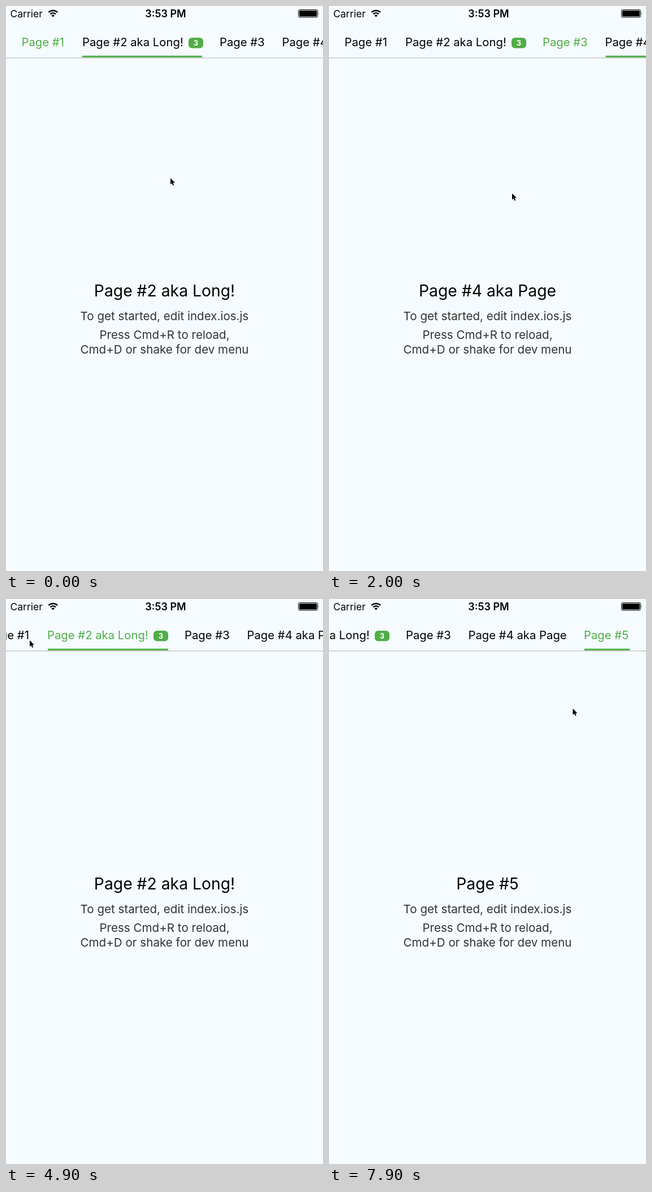
Write an HTML page that moves like this. It is 561 px wide and 998 px high and loops after 8000 ms.

```html
<!DOCTYPE html>
<html lang="en">
<head>
<meta charset="utf-8">
<title>Scrollable tabs</title>
<style>
  html, body { margin: 0; width: 100%; height: 100%; overflow: hidden; background: #f5fbff; }
  svg { display: block; font-family: Inter, Roboto, sans-serif; }
  .status { font-size: 17.5px; }
  .clock { font-size: 18px; font-weight: 600; }
  .tab { font-size: 20.3px; }
  .on { fill: #50ad47; }
  .badge { font-size: 13px; font-weight: 700; fill: #fff; }
  .title { font-size: 28.3px; }
  .note { font-size: 20.6px; fill: #333; }
  .mid { text-anchor: middle; }
</style>
</head>
<body>
<svg width="561" height="998" viewBox="0 0 561 998">
  <g class="status">
    <text x="7.5" y="19.5">Carrier</text>
    <text class="clock mid" x="282.5" y="19.5">3:53 PM</text>
  </g>
  <g fill="none" stroke="#000" stroke-width="2.4">
    <path d="M75.3 11.2a11.2 11.2 0 0 1 15.8 0M78.4 14.4a6.8 6.8 0 0 1 9.6 0"/>
    <path d="M83.2 19.6l-2.8-2.8a4 4 0 0 1 5.6 0z" fill="#000" stroke="none"/>
    <rect x="517.5" y="6.5" width="34" height="13.5" rx="2.5" stroke-width="1"/>
    <rect x="519" y="8" width="31" height="10.5" rx="1.2" fill="#000" stroke="none"/>
    <path d="M552.6 11q1.6 2.2 0 4.4z" fill="#000" stroke="none"/>
  </g>
  <path d="M0 91.7H561" stroke="#c6c9cb" stroke-width="1.5"/>
  <g id="bar">
    <rect id="line" class="on" y="87.7" height="3.1"/>
    <rect class="on" x="323" y="56" width="26" height="18.5" rx="6"/>
    <text class="badge mid" x="336" y="70">3</text>
  </g>
  <g id="pages"></g>
  <path id="cursor" d="M0 0V11.3L2.6 8.9 4.4 13 6.2 12.2 4.5 8.2H8Z" stroke="#fff" stroke-width="1" paint-order="stroke"/>
</svg>
<script>
const LOOP = 8000, STEP = 100, WIDTH = 561, PAGE = 564.5;
const SLIDE = 600, SCROLL = 300, SETTLE = 700, LAG = 33;
const MARGIN = 74, MAX_SCROLL = 242;

const tabs = [
  { name: 'Page #1', left: 28.5, right: 106 },
  { name: 'Page #2 aka Long!', left: 136, right: 349 },
  { name: 'Page #3', left: 379, right: 459 },
  { name: 'Page #4 aka Page', left: 489.5, right: 663 },
  { name: 'Page #5', left: 694, right: 774.5 }
];

// A tap selects its tab at once; a swipe selects it after the page settles.
const moves = [
  { start: -600, page: 1 },
  { start: 560, page: 2 },
  { start: 1360, page: 3 },
  { start: 2400, page: 4 },
  { start: 3900, page: 1, tap: true },
  { start: 4920, page: 0, tap: true },
  { start: 6500, page: 3, tap: true },
  { start: 7120, page: 4, tap: true }
];

// Cursor stops: time, x, y.
const stops = [
  [0, 291, 304], [550, 425, 309], [900, 207, 314], [1400, 425, 325], [1760, 205, 329],
  [2240, 443, 333], [2700, 205, 335], [3800, 94.5, 72], [4300, 85, 45], [4900, 42, 73],
  [5900, 416, 87], [6400, 511, 69], [7200, 518, 70], [7900, 431.5, 193.5]
];

const $ = id => document.getElementById(id);
const clamp = (v, lo, hi) => Math.min(hi, Math.max(lo, v));
const mix = (a, b, k) => a + (b - a) * k;
const ease = k => (k = clamp(k, 0, 1), k * k * (3 - 2 * k));

// Each move scrolls the bar only as far as its tab needs.
let page = 0, scroll = 0;
for (const m of moves) {
  const { left, right } = tabs[m.page];
  const next = clamp(clamp(scroll, right + MARGIN - WIDTH, left - MARGIN), 0, MAX_SCROLL);
  m.select = m.start + (m.tap ? 0 : SETTLE);
  m.pageStep = m.page - page;
  m.scrollStep = next - scroll;
  page = m.page;
  scroll = next;
}

const sum = f => moves.reduce((total, m) => total + f(m), 0);
const pageAt = t => sum(m => m.pageStep * ease((t - m.start) / SLIDE));
const scrollAt = t => sum(m => m.scrollStep * ease((t - m.select) / SCROLL));
const activeAt = t => sum(m => t >= m.select ? m.pageStep : 0);

function cursorAt(t) {
  const i = Math.max(1, stops.findIndex(s => s[0] >= t));
  const [t0, x0, y0] = stops[i - 1], [t1, x1, y1] = stops[i];
  const k = ease((t - t0) / (t1 - t0));
  return [mix(x0, x1, k), mix(y0, y1, k)];
}

function addText(parent, cls, x, y, text) {
  const el = document.createElementNS('http://www.w3.org/2000/svg', 'text');
  el.setAttribute('class', cls);
  el.setAttribute('x', x);
  el.setAttribute('y', y);
  el.textContent = text;
  parent.append(el);
  return el;
}

const move = (id, x, y) => $(id).setAttribute('transform', `translate(${x} ${y})`);

tabs.forEach((tab, i) => {
  const x = 280.5 + i * PAGE;
  tab.label = addText($('bar'), 'tab', tab.left - 1, 71, tab.name);
  addText($('pages'), 'title mid', x, 512.5, tab.name);
  addText($('pages'), 'note mid', x, 555, 'To get started, edit index.ios.js');
  addText($('pages'), 'note mid', x, 588, 'Press Cmd+R to reload,');
  addText($('pages'), 'note mid', x, 613.5, 'Cmd+D or shake for dev menu');
});

function draw(now) {
  const t = Math.floor(now % LOOP / STEP) * STEP;
  move('pages', -pageAt(t) * PAGE, 0);
  move('bar', -scrollAt(t), 0);
  move('cursor', ...cursorAt(t));

  // The underline trails the page slightly.
  const p = clamp(pageAt(t - LAG), 0, tabs.length - 1);
  const from = tabs[Math.floor(p)], to = tabs[Math.ceil(p)], k = p % 1;
  const left = mix(from.left, to.left, k);
  $('line').setAttribute('x', left);
  $('line').setAttribute('width', mix(from.right, to.right, k) - left);

  const active = activeAt(t);
  tabs.forEach((tab, i) => tab.label.classList.toggle('on', i === active));
  requestAnimationFrame(draw);
}
requestAnimationFrame(draw);
</script>
</body>
</html>
```
